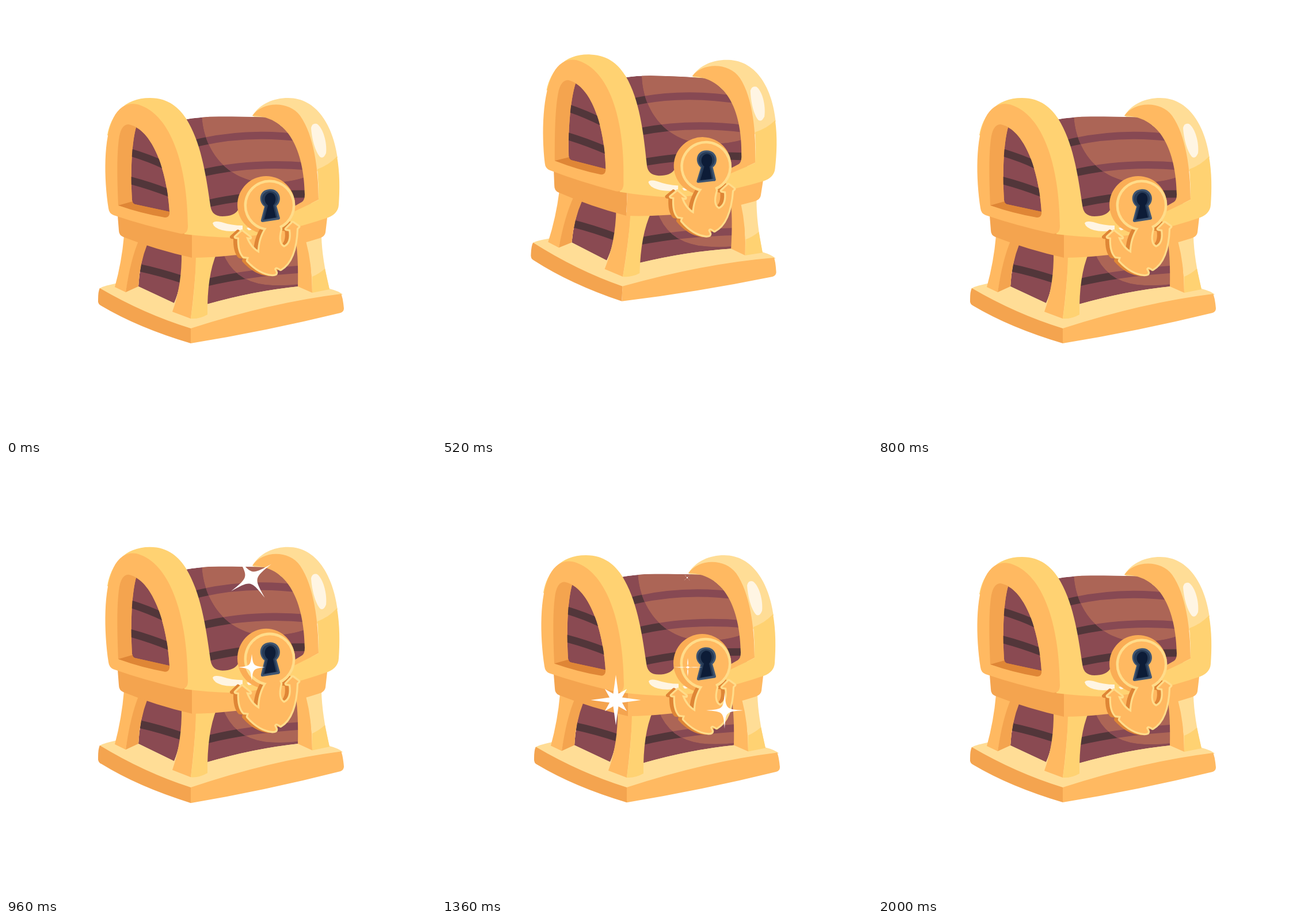
Write an HTML page with a canvas that moves like this. It is 747 px wide and 750 px high and loops after 2040 ms.

```html
<!DOCTYPE html>
<html lang="en">
<head>
<meta charset="utf-8">
<title>Treasure chest</title>
<style>
html, body { margin: 0; width: 100%; height: 100%; overflow: hidden; background: #fff; }
canvas { display: block; }
</style>
</head>
<body>
<canvas id="stage" width="747" height="750"></canvas>
<script>
const ctx = document.getElementById('stage').getContext('2d');
const LOOP = 2040, STEP = 40;

const C = {
  wood: '#8a4a52', dark: '#52363a', glow: '#ac6556', glowLine: '#874953',
  gold: '#ffb961', rim: '#faad55', shade: '#f4a44f', deep: '#df8636',
  yellow: '#ffd272', cream: '#ffdd96', edge: '#ffdc8a', gloss: '#fff5e3',
  steel: '#405672', slate: '#263a56', navy: '#0d1c37'
};

const paths = new Map();
function path(d) {
  if (!paths.has(d)) paths.set(d, new Path2D(d));
  return paths.get(d);
}
function fill(color, d) {
  ctx.fillStyle = color;
  ctx.fill(path(d));
}
function lines(color, list, width) {
  ctx.strokeStyle = color;
  ctx.lineWidth = width;
  for (const d of list) ctx.stroke(path(d));
}
function disc(color, x, y, r) {
  ctx.fillStyle = color;
  ctx.beginPath();
  ctx.arc(x, y, r, 0, 2 * Math.PI);
  ctx.fill();
}

// Wooden panel with planks and an optional round sheen
function panel(shape, planks, sheen) {
  ctx.save();
  ctx.clip(path(shape));
  fill(C.wood, shape);
  lines(C.dark, planks, 13);
  if (sheen) {
    ctx.clip(path(sheen));
    fill(C.glow, sheen);
    lines(C.glowLine, planks, 13);
  }
  ctx.restore();
}

function drawBase() {
  // plinth
  fill(C.cream, 'M162 492 Q166 488 190 483 L300 440 L500 440 L562 492 Q578 496 585 502 L460 540 L321 566 L200 520 Z');
  fill(C.shade, 'M163 491 Q240 536 321 561 L321 587 Q230 560 166 522 Q159 519 160 511 Q160 496 163 491 Z');
  fill(C.gold, 'M321 561 Q460 516 582 501 Q585 506 587 526 Q587 532 581 534 Q450 566 321 587 Z');

  // body
  panel('M244 412 L308 430 L306 450 Q304 490 292 517 L230 488 Q232 450 244 412 Z',
    ['M225 454 Q265 462 310 477']);
  panel('M355 425 L512 400 L508 488 Q430 496 349 519 Z',
    ['M345 482 Q420 464 515 458'],
    'M376 428 Q395 478 450 485 Q480 488 510 484 L510 390 L380 400 Z');

  // outer legs
  fill(C.gold, 'M205 400 L233 407 Q218 440 208 498 L189 489 Q201 446 205 400 Z');
  fill(C.shade, 'M231 407 L246 413 Q232 448 230 488 L208 498 Q216 442 231 407 Z');
  fill(C.gold, 'M504 412 L523 408 Q532 450 532 499 L507 488 Q508 440 504 412 Z');
  fill(C.cream, 'M521 409 L548 401 Q549 440 562 493 L532 499 Q532 450 521 409 Z');
  fill(C.yellow, 'M532 471 Q544 466 554 457 L562 493 L532 499 Z');

  // corner leg
  fill(C.gold, 'M305 428 L331 434 Q328 490 321 544 L289 532 Q306 485 305 428 Z');
  fill(C.yellow, 'M330 434 L366 430 Q349 470 350 537 Q336 545 321 544 Q329 490 330 434 Z');

  // band
  fill(C.shade, 'M194 365 L323 398 L323 438 Q260 424 204 402 Q196 399 196 390 Z');
  fill(C.gold, 'M323 398 L559 360 L555 394 Q554 401 545 404 Q470 428 392 434 Q355 438 323 438 Z');
}

function drawLid() {
  // far arch
  fill(C.cream, 'M428 191 C441 170 465 160 490 160 C540 160 568 208 576 264 L540 288 L500 230 Z');
  panel('M308 198 Q340 192 375 192.5 Q420 192 460 194 L515 240 L530 345 L495 370 L350 370 Z',
    ['M325 240 Q415 217 515 230', 'M335 292 Q425 270 525 279', 'M345 345 Q425 326 530 327'],
    'M340 185 C340 240 375 305 455 308 Q500 307 530 294 L520 185 Z');
  fill(C.gold, 'M428 191 C445 166 491 164 511 191 C535 225 543 285 543 337 L500 359 L500 349 L514 341 Q519 338 519 328 C518 265 498 192 428 191 Z');

  // near arch rim and lower front
  fill(C.yellow, 'M176 225 C182 190 205 160 250 160 C283 160 301 178 313 196 C338 236 347 290 355 347 Q357 366 376 366 Q396 366 403 355 L420 365 L500 358 L543 337 Q543 310 541 284 Q560 277 575 262 C580 290 580 320 578 346 Q577 361 560 368 Q470 399 392 403 Q350 402 310 397 L290 250 Z');
  fill(C.gold, 'M187 364 Q179 361 178 352 C170 300 169 230 187 194 C198 172 217 166 234 173 C286 192 315 275 316 383 Q316 398 303 396 Q240 382 187 364 Z');

  // arch opening
  fill(C.shade, 'M195 347 C193 300 192 255 197 226 Q201 206 213 206 C254 214 278 285 284 356 Q285 368 277 368 Z');
  fill(C.deep, 'M195 347 L220 340 L284 357 Q285 368 276 368 Q235 361 195 347 Z');
  panel('M226 211 C260 230 280 295 284 358 L224 345 Q220 344 219 338 C216 292 218 240 226 211 Z',
    ['M210 253 Q245 263 275 277', 'M210 302 Q250 312 290 328']);

  // shine
  fill(C.gloss, 'M530 212 Q532 203 540 205 C551 212 558 238 556 256 Q552 266 546 263 C537 254 531 230 530 212 Z');
  fill(C.gloss, 'M359 378 Q361 373 374 376 Q392 382 411 382 L411 390 Q390 394 375 390 Q361 386 359 378 Z');
  fill(C.gloss, 'M418 386 L428 385 Q428 391 421 390 Z');
}

const ANCHOR = 'M453 386 Q440 405 440 430 Q424 422 417 402 L424 403 L410 392 L399 402 L405 403 ' +
  'Q404 427 413 436 L422 437 L420 443 Q440 465 463 467 Q469 467 469 464 L466 458 Q468 451 477 458 ' +
  'Q503 443 505 387 L508 384 L498 377 L487 388 L494 389 Q498 414 483 420 Q470 414 477 388 L474 380 Z';

function drawLock() {
  ctx.lineJoin = 'round';
  disc(C.rim, 452, 346, 50);

  ctx.save();
  ctx.translate(-7, 0);
  fill(C.deep, ANCHOR);
  lines(C.deep, [ANCHOR], 6);
  ctx.restore();

  lines(C.edge, [ANCHOR], 6.5);
  disc(C.edge, 458, 347, 44.5);
  fill(C.gold, ANCHOR);
  disc(C.gold, 458, 347, 40);

  fill(C.steel, 'M449 349 C437 340 440 320 457 319 C475 317 482 338 470 348 L476 369 Q476 372 472 372 L446 376 Q442 376 443 372 Z');
  fill(C.slate, 'M451 348 C440 339 444 324 457 322 C472 321 478 338 467 347 L472 368 L446 373 Z');
  fill(C.navy, 'M455 347 C446 340 449 326 459 325 C470 325 471 341 464 347 L469 368 L449 371 Z');
}

function bezier(x, x1, x2) {
  let lo = 0, hi = 1;
  for (let i = 0; i < 24; i++) {
    const s = (lo + hi) / 2, r = 1 - s;
    if (3 * r * r * s * x1 + 3 * r * s * s * x2 + s ** 3 < x) lo = s; else hi = s;
  }
  return smooth(lo);
}
const smooth = u => u * u * (3 - 2 * u);

// Linear interpolation over [time, value] pairs, zero outside
function keys(t, list) {
  for (let i = 1; i < list.length; i++) {
    const [a, p] = list[i - 1], [b, q] = list[i];
    if (t >= a && t <= b) return p + (q - p) * (t - a) / (b - a);
  }
  return 0;
}

function pose(t) {
  const tilt = keys(t, [[0, 0], [200, -3.7], [600, 3.7], [800, 0]]);
  const near = Math.max(0, 1 - Math.abs(t - 400) / 400);
  const lift = -79 * bezier(near, 0.333, 0.4);
  const grow = 1 + 0.078 * smooth(keys(t, [[800, 0], [1100, 1], [1420, 0]]));
  ctx.translate(374, 365 + lift);
  ctx.rotate(tilt * Math.PI / 180);
  ctx.translate(-374, 195);
  ctx.scale(1, grow);
  ctx.translate(0, -560);
}

// Star with concave sides; k sets how full the waist is
function star(x, y, rx, ry, k, turn = 0) {
  if (rx <= 0 || ry <= 0) return;
  ctx.save();
  ctx.translate(x, y);
  ctx.rotate(turn * Math.PI / 180);
  ctx.scale(rx, ry);
  ctx.beginPath();
  ctx.moveTo(1, 0);
  for (const [a, b, ex, ey] of [[k, k, 0, 1], [-k, k, -1, 0], [-k, -k, 0, -1], [k, -k, 1, 0]]) {
    ctx.bezierCurveTo(a, b, a, b, ex, ey);
  }
  ctx.fillStyle = '#fff';
  ctx.fill();
  ctx.restore();
}

function burst(x, y, r) {
  if (r <= 0) return;
  ctx.beginPath();
  for (let i = 0; i < 16; i++) {
    const d = r * (i % 2 ? 0.27 : i % 4 ? 0.62 : 1), a = i * Math.PI / 8;
    ctx.lineTo(x + d * Math.cos(a), y + d * Math.sin(a));
  }
  ctx.fillStyle = '#fff';
  ctx.fill();
}

function sparkles(t) {
  const a = keys(t, [[820, 0], [980, 48], [1430, 0]]);
  star(426, 196, a, a, keys(t, [[820, 0.08], [980, 0.08], [1430, -0.08]]), 56 - Math.max(0, t - 960) * 0.02);
  star(427, 352,
    keys(t, [[840, 0], [960, 23], [1120, 32], [1360, 26], [1440, 0]]),
    keys(t, [[840, 0], [960, 23], [1120, 32], [1360, 16], [1440, 0]]),
    keys(t, [[840, 0.13], [1120, 0.08], [1360, -0.08], [1440, -0.08]]));
  burst(302, 409, keys(t, [[1160, 0], [1380, 48], [1660, 0]]));
  const d = keys(t, [[1200, 0], [1400, 40], [1640, 0]]);
  star(491, 427, d, d, 0.07);
}

function draw(t) {
  ctx.setTransform(1, 0, 0, 1, 0, 0);
  ctx.fillStyle = '#fff';
  ctx.fillRect(0, 0, 747, 750);
  ctx.save();
  pose(t);
  drawBase();
  drawLid();
  drawLock();
  ctx.restore();
  sparkles(t);
}

const start = performance.now();
function tick() {
  const t = (performance.now() - start) % LOOP;
  draw(Math.floor(t / STEP) * STEP);
  requestAnimationFrame(tick);
}
tick();
</script>
</body>
</html>
```
